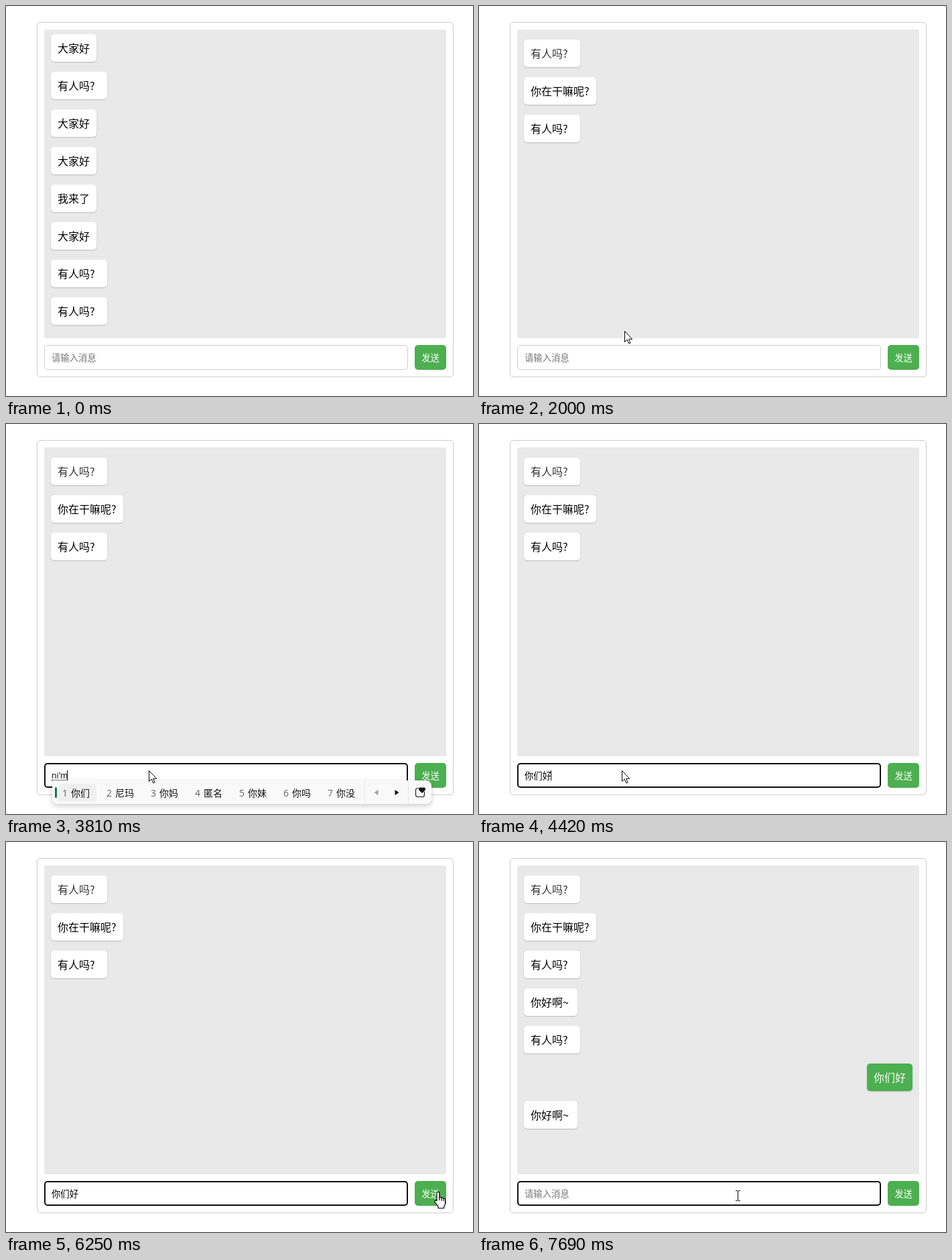
An HTML page that plays this animation: 697 by 581 pixels, repeating every 8000 ms.

```html
<!DOCTYPE html>
<html lang="zh-CN">
<head>
<meta charset="utf-8">
<title>聊天室</title>
<style>
html, body { margin: 0; width: 100%; height: 100%; overflow: hidden; background: #fff; }
body { position: relative; font-family: "Noto Sans CJK SC", "Noto Sans CJK", sans-serif; }
body > *, .bubble { position: absolute; box-sizing: border-box; }
.panel { left: 46px; top: 24px; width: 622px; height: 529px; border: 1px solid #ccc; border-radius: 5px; }
.chat { left: 57px; top: 35px; width: 600px; height: 460px; background: #e9e9e9; border-radius: 3px; overflow: hidden; }
.bubble {
  left: 10px; height: 41px; padding: 10px; border-radius: 5px; background: #fff; color: #000;
  font-size: 16px; line-height: 21px; white-space: nowrap; box-shadow: 0 1px 2px rgba(0, 0, 0, .2);
}
.bubble.mine { left: auto; right: 10px; background: #4caf50; color: #fff; }
.field {
  left: 57px; top: 505px; width: 543px; height: 37px; padding-left: 11px; border-radius: 5px;
  display: flex; align-items: center; font-size: 13.333px; line-height: 15px; white-space: pre;
  background: #fff; box-shadow: inset 0 0 0 1px #ccc;
}
.field.focus { box-shadow: inset 0 0 0 2px #101010; }
.typed.pinyin { font: 12.3px/13px "Open Sans", sans-serif; border-bottom: 1px dotted #000; }
.caret { width: 1px; height: 15px; margin-right: -1px; background: #000; }
.typed:not(:empty) + .caret { margin-left: -1px; margin-right: 0; }
.hint { color: #757575; }
.send {
  left: 610px; top: 505px; width: 47px; height: 37px; border-radius: 5px; background: #4caf50;
  color: #fff; font-size: 13.333px; line-height: 37px; text-align: center;
}
.ime {
  left: 69px; top: 531px; height: 35px; display: flex; border-radius: 8px; background: #f9f9f9;
  box-shadow: 0 3px 8px rgba(0, 0, 0, .2); font-size: 14px; line-height: 26px; white-space: nowrap;
}
.words { display: flex; gap: 9px; min-width: 466px; box-sizing: border-box; padding: 5px 4px 4px 9px; }
.word { padding: 0 10px 0 6px; border-radius: 4px; color: #111; }
.word b { display: inline-block; width: 13px; font: 14px "Open Sans", sans-serif; color: #666; }
.word:first-child { background: #efefef; }
.ime::before { content: ""; position: absolute; left: 4px; top: 10px; width: 3px; height: 16px; border-radius: 2px; background: #17764a; }
.pointer { left: 0; top: 0; overflow: visible; }
.pointer path { stroke: #000; fill: #fff; }
</style>
</head>
<body>
<div class="panel"></div>
<div class="chat"></div>
<div class="field"><span class="typed"></span><i class="caret"></i><span class="hint">请输入消息</span></div>
<div class="send">发送</div>
<div class="ime">
  <div class="words"></div>
  <svg width="100" height="35">
    <path d="M.5 0V35M65.5 0V35" stroke="#e6e6e6"/>
    <path d="M14.5 18l6-4v8z" fill="#a0a0a0"/>
    <path d="M51.5 18l-6-4v8z" fill="#111"/>
    <rect x="76.5" y="11.5" width="13" height="13" rx="3" fill="none" stroke="#222" stroke-width="1.2"/>
    <path d="M86 19l-4.5-4.5a2.6 2.6 0 0 1 4.5-3 2.6 2.6 0 0 1 4.5 3z" fill="#111" stroke="#f9f9f9" stroke-width="1.5" paint-order="stroke"/>
  </svg>
</div>
<svg class="pointer" width="20" height="28">
  <path class="arrow" d="M.5.5V16.5L4.2 13l2.6 5.9 2.3-1-2.6-5.6H11.7Z"/>
  <path class="beam" d="M-3 -7.5h3M1 -7.5h3M.5 -7V7M-3 7.5h3M1 7.5h3"/>
  <path class="hand" stroke-width="1.2" d="M-2 14V2a1.9 1.9 0 0 1 3.8 0V9a1.7 1.7 0 0 1 3.2 .6 1.7 1.7 0 0 1 3 .8 1.6 1.6 0 0 1 2.6 1.2V17q0 3-2 5v2.5H0V22L-5 15.5a1.8 1.8 0 0 1 3-1.9zM1.8 9v4M5 10v3.5M8 11v3"/>
</svg>
<script>
const LOOP = 8000, STEP = 70;
const RELOAD = 1330, FOCUS = 2340, TYPE = 3410, COMMIT = 4420, LEAVE = 5410, SEND = 6530, REFOCUS = 7160;
const $ = s => document.querySelector(s);
const within = (t, a, b) => t >= a && t < b;

// Chat messages: [appears at, text, sent by me]
const anyone = "有人吗?", hello = "大家好", hi = "你好啊~";
const boxWidth = { [anyone]: 84, [hi]: 80, "你在干嘛呢?": 108 };
const before = [hello, anyone, hello, hello, "我来了", hello, anyone, anyone].map(text => [0, text]);
const after = [
  [RELOAD, anyone], [1610, "你在干嘛呢?"], [1890, anyone],
  [6320, hi], [6460, anyone], [SEND, "你们好", true], [6740, hi]
];

function addBubbles(list, top, end) {
  return list.map(([start, text, mine], i) => {
    const el = document.createElement("div");
    el.className = mine ? "bubble mine" : "bubble";
    el.textContent = text;
    el.style.top = top + i * 56 + "px";
    el.style.width = (boxWidth[text] || 68) + "px";
    $(".chat").append(el);
    return { el, start, end };
  });
}
const bubbles = [...addBubbles(before, 7, RELOAD), ...addBubbles(after, 15, LOOP)];
bubbles[before.length].el.style.color = "#333";

// Pinyin input: [time, letters, candidates]
const pair = "你们 尼门 你门 匿名 泥门 拟门 妮们";
const phrase = "你们好 你们会 你们和 你们 你门 匿名 泥门";
const typing = [
  [TYPE, "n", "你 那 嗯 年 能 呢 内"],
  [3510, "ni", "你 尼 呢 泥 拟 逆 妮"],
  [3810, "ni'm", "你们 尼玛 你妈 匿名 你妹 你吗 你没"],
  [3880, "ni'me", pair],
  [3950, "ni'men", pair],
  [4150, "ni'men'h", phrase],
  [4240, "ni'men'ha", phrase],
  [4330, "ni'men'hao", phrase]
];

// Pointer moves: [start, end, from, bend, to]; null hides it
const still = (t, x, y) => [t, t, [x, y], [x, y], [x, y]];
const moves = [
  [130, 270, [646, 564], [568, 340], [490, 117]],
  [330, 330, null],
  [1470, 2000, [279, 42], [240, 300], [217, 484]],
  still(2070, 215, 505),
  still(2140, 215, 516),
  still(2670, 215, 517),
  still(TYPE, 213, 516),
  [LEAVE, 6180, [213, 516], [420, 343], [645, 521]],
  [6530, 7020, [645, 521], [520, 532], [386, 527]]
];

function pointerAt(t) {
  const move = moves.findLast(m => t >= m[0]);
  if (!move || !move[2]) return null;
  const [start, end, a, b, c] = move;
  if (t >= end) return c;
  let u = Math.floor((t - start) / STEP) * STEP / (end - start);
  u = u * (2 - u);
  return a.map((v, i) => Math.round((1 - u) ** 2 * v + 2 * u * (1 - u) * b[i] + u * u * c[i]));
}

function pointerKind(t, [x, y]) {
  if (within(t, TYPE, LEAVE) || y < 505 || y >= 542) return "arrow";
  if (within(x, 57, 600)) return "beam";
  return within(x, 610, 657) ? "hand" : "arrow";
}

const show = (el, on) => { el.style.display = on ? "" : "none"; };
let lastWords = "";

function showWords(words) {
  if (words === lastWords) return;
  lastWords = words;
  $(".words").innerHTML = words.split(" ")
    .map((w, i) => `<div class="word"><b>${i + 1}</b>${w}</div>`).join("");
}

function render(t) {
  for (const b of bubbles) show(b.el, within(t, b.start, b.end));

  const composing = within(t, TYPE, COMMIT);
  const entry = composing && typing.findLast(k => t >= k[0]);
  const text = composing ? entry[1] : within(t, COMMIT, SEND) ? "你们好" : "";
  $(".typed").textContent = text;
  $(".typed").classList.toggle("pinyin", composing);
  show($(".hint"), !text);
  show($(".ime"), composing);
  if (composing) showWords(entry[2]);

  $(".field").classList.toggle("focus", within(t, FOCUS, SEND) || t >= REFOCUS);
  const lit = [FOCUS, COMMIT, COMMIT + 1060, REFOCUS].some(s => within(t, s, s + 530));
  show($(".caret"), composing || lit);

  const spot = pointerAt(t);
  show($(".pointer"), spot);
  if (spot) {
    $(".pointer").style.transform = `translate(${spot[0]}px, ${spot[1]}px)`;
    const kind = pointerKind(t, spot);
    for (const name of ["arrow", "beam", "hand"]) show($("." + name), name === kind);
  }
}

const origin = performance.now();
function tick() {
  render((performance.now() - origin) % LOOP);
  requestAnimationFrame(tick);
}
tick();
</script>
</body>
</html>
```
